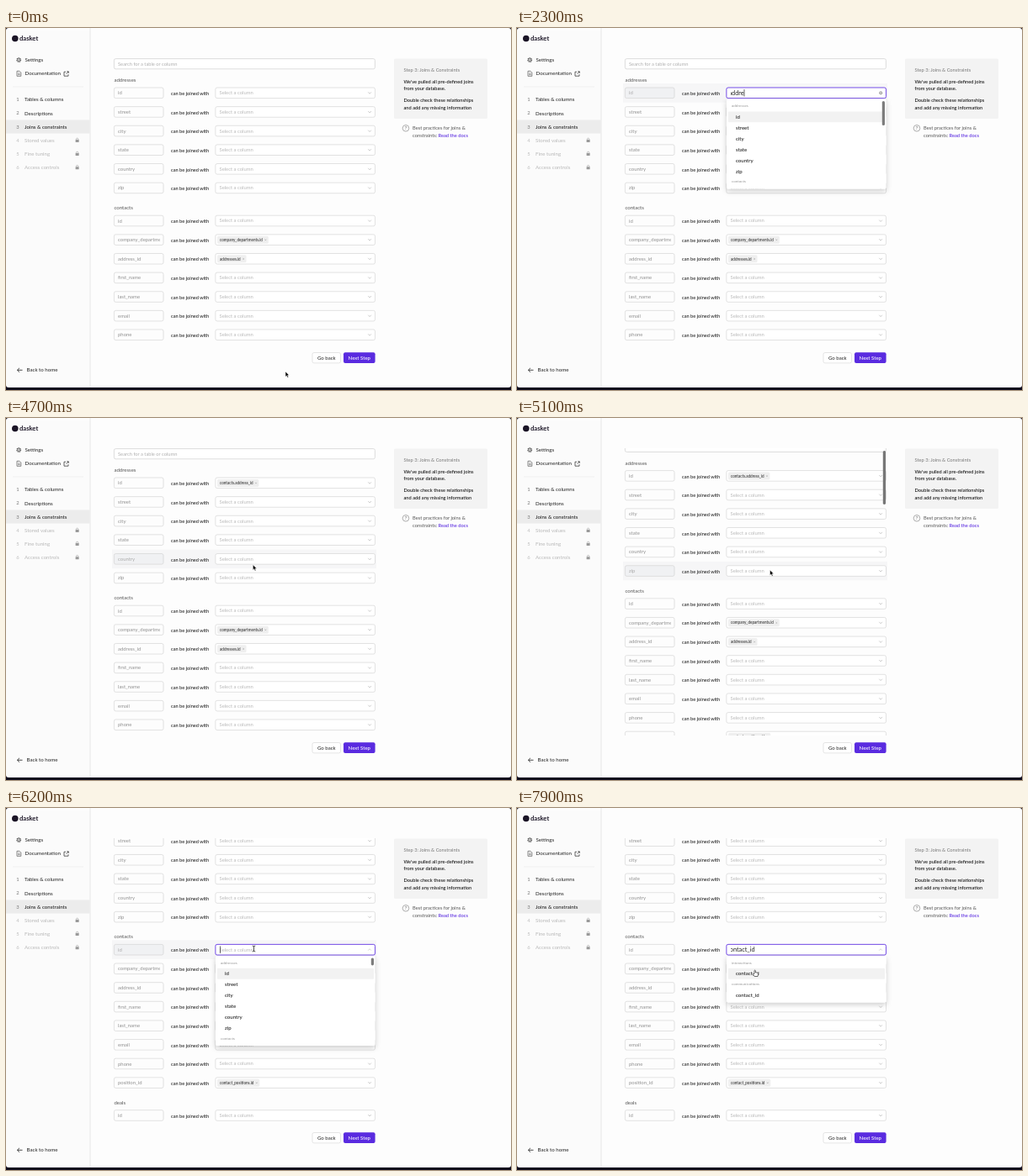
Recreate the animation shown at these times as an HTML page. Size 600 by 431 pixels, loop 8 s.

```html
<!DOCTYPE html>
<html lang="en">
<head>
<meta charset="utf-8">
<title>Joins and constraints</title>
<style>
  html, body { margin: 0; width: 100%; height: 100%; overflow: hidden; background: #0e0a1c; }
  svg { display: block; width: 600px; height: 431px; font-family: Lato, "Open Sans", sans-serif; }
</style>
</head>
<body>
<svg id="stage" viewBox="0 0 600 431" xmlns="http://www.w3.org/2000/svg">
  <defs>
    <clipPath id="listClip"><rect x="126" y="36" width="316" height="342"/></clipPath>
    <clipPath id="fieldClip"><rect x="120" y="0" width="63" height="431"/></clipPath>
    <clipPath id="inputClip"><rect x="254" y="0" width="170" height="431"/></clipPath>
    <filter id="shadow" x="-10%" y="-15%" width="120%" height="135%">
      <feDropShadow dx="0" dy="2.5" stdDeviation="3" flood-opacity=".2"/>
    </filter>
  </defs>
  <g id="shell"></g>
  <g id="live"></g>
</svg>
<script>
const LOOP = 8000, TICK = 100;
const PURPLE = '#5a2be0', GREY = '#aaa', DARK = '#222';
const ROW = 22.63, OPTION = 12.9, VIEW = 103;

const addresses = ['#addresses', 'id', 'street', 'city', 'state', 'country', 'zip', '#contacts'];
const contacts = ['#contacts', 'id', 'company_department_id', 'address_id', 'first_name', 'last_name', 'email', 'phone'];
const contactIds = ['#interactions', 'contact_id', '#communications', 'contact_id'];

const tables = [
  { name: 'addresses', y: 62, first: 77.3, fields: addresses.slice(1, 7) },
  { name: 'contacts', y: 214, first: 229.5,
    fields: ['id', 'company_departments_id', 'address_id', 'first_name', 'last_name', 'email', 'phone', 'position_id'] },
  { name: 'deals', y: 411.3, first: 426.8, fields: ['id'] }
];
const rows = tables.flatMap(t => t.fields.map((field, i) =>
  ({ key: t.name + '.' + field, field, y: t.first + i * ROW })));
const joins = {
  'contacts.company_departments_id': 'company_departments.id',
  'contacts.address_id': 'addresses.id',
  'contacts.position_id': 'contact_positions.id'
};

// Time, then values
const mousePath = [
  [0, 332, 409], [900, 227, 41.5], [1000, 227, 41.5], [1300, 272, 76], [3200, 272, 76],
  [3400, 270, 106], [3600, 270, 106], [3800, 273, 154], [4000, 273, 157], [4300, 273, 157],
  [4900, 300.5, 181], [5500, 300.5, 181], [5700, 294.5, 167.5], [7500, 294.5, 167.5], [7800, 283, 196.5]
];
const pageScroll = [[4900, 0], [5000, 2], [5100, 8.4], [5200, 25], [5300, 42], [5400, 55], [5500, 60.8]];
const menuScroll = [[3400, 0], [3700, 38.9]];
const typing = [
  [0, ''], [2100, 'ad'], [2200, 'addr'], [2300, 'addre'], [2400, 'addres'], [2500, 'address'], [4200, ''],
  [6500, 'c'], [6600, 'co'], [6700, 'cont'], [6800, 'conta'], [6900, 'contac'], [7000, 'contact'],
  [7100, 'contact_'], [7400, 'contact_i'], [7500, 'contact_id']
];
const caretOn = [[1400, 1700], [1900, 2700], [3000, 3200], [5800, 6000], [6200, 7600]];

const within = (t, a, b) => t >= a && t < b;
const ease = p => p * p * (3 - 2 * p);

function along(keys, t, curve = ease) {
  if (t <= keys[0][0]) return keys[0].slice(1);
  const i = keys.findIndex(k => k[0] > t);
  if (i < 0) return keys[keys.length - 1].slice(1);
  const a = keys[i - 1], b = keys[i], p = curve((t - a[0]) / (b[0] - a[0]));
  return a.slice(1).map((v, n) => v + (b[n + 1] - v) * p);
}

const pen = document.createElement('canvas').getContext('2d');
function widthOf(text, size, weight = 400) {
  pen.font = `${weight} 100px Lato, "Open Sans", sans-serif`;
  return pen.measureText(text).width * size / 100;
}

const text = (x, y, s, size = 5.8, fill = DARK, extra = '') =>
  `<text x="${x}" y="${y + size * .34}" font-size="${size}" fill="${fill}" ${extra}>${s.replace(/&/g, '&amp;')}</text>`;
const box = (x, y, w, h, fill, rx = 0, extra = '') =>
  `<rect x="${x}" y="${y}" width="${w}" height="${h}" rx="${rx}" fill="${fill}" ${extra}/>`;
const line = (d, stroke = '#333', w = .8, extra = '') =>
  `<path d="${d}" fill="none" stroke="${stroke}" stroke-width="${w}" ${extra}/>`;
const dot = (x, y, r, fill, extra = '') => `<circle cx="${x}" cy="${y}" r="${r}" fill="${fill}" ${extra}/>`;
const medium = 'font-weight="500"';

function shell() {
  let s = box(0, 0, 600, 428, '#fdfdfd', 3) + box(0, 3, 100, 422, '#fbfbfb') + line('M100 0V428', '#e3e3e3', .8);
  s += dot(10.8, 12.5, 3.8, '#1b1526') + text(16, 12.5, 'dasket', 7.6, '#1b1526', 'font-weight="700"');
  s += dot(15.2, 38, 2.3, 'none', 'stroke="#555" stroke-width="1.1" stroke-dasharray="1.2 .6"')
    + dot(15.2, 38, 1.8, 'none', 'stroke="#555" stroke-width=".6"') + dot(15.2, 38, .7, '#555');
  s += text(22.5, 38, 'Settings', 6.2);
  s += line('M13 51.3h3l1.8 1.8v4.2h-4.8zM14.2 54h2.4M14.2 55.6h2.4', '#555', .7);
  s += text(22.5, 54.3, 'Documentation', 6.2);
  s += line('M71 52.2h-2v5h5v-2M71.6 54.7l2.6-2.8M72.3 51.8h2v2', '#333', .75);
  s += line('M8 70H92', '#e9e9e9', .6);
  s += box(0, 109.5, 99.6, 16, '#ececec');
  ['Tables & columns', 'Descriptions', 'Joins & constraints', 'Stored values', 'Fine tuning', 'Access controls']
    .forEach((label, i) => {
      const y = 85.3 + i * 16.15, locked = i > 2;
      s += text(12.3, y, String(i + 1), 5.8, locked ? '#bbb' : '#777');
      s += text(22, y, label, 6.1, locked ? '#b8b8b8' : DARK, i === 2 ? medium : '');
      if (locked) s += box(82.6, y - .8, 4, 3, '#999', .5) + line(`M83.4 ${y - .6}v-.8a1.2 1.2 0 0 1 2.4 0v.8`, '#999', .6);
    });
  s += line('M19.5 407.3h-6M16 404.8l-2.6 2.5 2.6 2.5', DARK, .8) + text(24.5, 407.3, 'Back to home', 6.15);

  s += box(461, 36.5, 111, 71.5, '#f3f3f3', 1.5) + text(472.5, 50, 'Step 3: Joins & Constraints', 5.7, '#777');
  [[63.6, "We've pulled all pre-defined joins"], [72.3, 'from your database.'],
   [86, 'Double check these relationships'], [94.7, 'and add any missing information']]
    .forEach(([y, words]) => { s += text(472.5, y, words, 5.7, '#111', medium); });
  s += dot(475, 119.3, 3.8, 'none', 'stroke="#777" stroke-width=".6"')
    + text(475, 119.3, '?', 5.6, '#666', 'text-anchor="middle"');
  s += text(483, 119, 'Best practices for joins &', 5.75, '#555') + text(483, 127.7, 'constraints:', 5.75, '#555')
    + text(513.5, 127.7, 'Read the docs', 5.75, PURPLE, medium);

  s += box(364, 386.5, 33.5, 12.4, '#fff', 2, 'stroke="#d4d4d4" stroke-width=".6"')
    + text(380.8, 392.8, 'Go back', 6.05, DARK, 'text-anchor="middle"');
  s += box(401, 386.3, 37.6, 12.8, PURPLE, 2) + text(419.8, 392.8, 'Next Step', 6.05, '#fff', 'text-anchor="middle" ' + medium);
  return s;
}

function chip(y, label) {
  const w = widthOf(label, 4.6, 500), x = 258 + w - .6;
  return box(251, y - 4.4, w + 9.8, 9, '#efefef', 1.5) + text(254, y + .2, label, 4.6, '#333', medium)
    + line(`M${x - .8} ${y - .6}l1.6 1.6m0 -1.6l-1.6 1.6`, '#888', .4);
}

function rowView(row, y, hovered, focused, label) {
  const border = 'stroke="#cfcfcf" stroke-width=".6"';
  let s = hovered ? box(126, y - 11.3, 314, ROW, '#f6f6f7') : '';
  s += box(128.4, y - 6.3, 58.6, 12.6, hovered ? '#f0f1f3' : '#fdfdfd', 2, border);
  s += text(133, y, row.field, 5.95, hovered ? '#aaa' : '#909090', 'clip-path="url(#fieldClip)"');
  s += text(196, y + .8, 'can be joined with', 5.65, '#222', medium);
  if (focused) s += box(248.4, y - 6.9, 190.6, 13.8, '#e3d9fb', 2.4);
  s += box(248.9, y - 6.3, 189.6, 12.6, '#fff', 2, focused ? `stroke="${PURPLE}" stroke-width=".8"` : border);
  if (label) s += chip(y, label);
  else if (!focused) s += text(253.5, y, 'Select a column', 5.85, '#b9b9b9');
  if (!focused) s += line(`M430.3 ${y - .9}l1.8 1.9 1.8 -1.9`, '#aaa', .6);
  return s;
}

function searchInput(y, typed, caret, clearable) {
  const size = 7.3, end = 254 + .86 * widthOf(typed, size);
  let s = typed ? `<g clip-path="url(#inputClip)">${text(end, y, typed, size, '#222', 'text-anchor="end"')}</g>`
    : text(253.5, y, 'Select a column', 5.85, '#b9b9b9');
  if (caret) s += box(typed ? end : 254, y - 4.2, .7, 8.4, '#222');
  s += clearable
    ? dot(432.2, y, 2.1, '#aaa') + line(`M431.5 ${y - .7}l1.4 1.4m0 -1.4l-1.4 1.4`, '#fff', .5)
    : line(`M430.3 ${y + .9}l1.8 -1.9 1.8 1.9`, '#bbb', .6);
  return s;
}

function menuFor(typed) {
  if (!typed) return { items: addresses, thumb: 9 };
  if (typed[0] === 'a') return { items: [...addresses, 'address_id', '#companies', 'address_id'], thumb: 29 };
  if (typed.length < 2) return { items: ['#addresses', 'city', 'country', ...contacts], thumb: 14 };
  if (typed.length < 3) return { items: ['#addresses', 'country', ...contacts], thumb: 16 };
  if (typed.length < 8) return { items: contacts, thumb: 24 };
  return { items: typed === 'contact_' ? [...contactIds, '#contact_positions', 'id'] : contactIds, thumb: 0 };
}

function menuView(y, typed, scroll, active, opacity) {
  const { items, thumb } = menuFor(typed);
  const top = y + 9.2, h = Math.min(VIEW, items.length * OPTION);
  let s = box(249, top - 2, 189.6, h + 4, '#fff', 2, 'filter="url(#shadow)"');
  s += `<clipPath id="menuClip">${box(249, top, 190, h, '#000')}</clipPath><g clip-path="url(#menuClip)">`;
  items.forEach((item, i) => {
    const mid = top + (i + .5) * OPTION - scroll;
    if (i === active) s += box(251, mid - OPTION / 2, 186, OPTION, '#f2f2f2', 1);
    s += item[0] === '#' ? text(255, mid - .4, item.slice(1), 4.6, '#999')
      : text(260, mid + .1, item, 6.05, '#1c1c1c', medium);
  });
  s += '</g>';
  if (thumb) {
    const slide = (VIEW - thumb) * Math.min(1, scroll / 38.9);
    s += box(433.8, top + .5 + slide, 3.2, thumb, '#7d7d7d', 1.6);
  }
  return `<g opacity="${opacity}">${s}</g>`;
}

function cursor(kind, x, y) {
  const shapes = {
    arrow: '<path d="M0 0V6.2L1.5 4.9L2.5 7.2L3.6 6.7L2.6 4.5H4.5Z" fill="#000" stroke="#fff" stroke-width=".5"/>',
    beam: line('M-1.7 -3.4Q0 -3.4 0 -2.4Q0 -3.4 1.7 -3.4M0 -2.6V2.6M-1.7 3.4Q0 3.4 0 2.4Q0 3.4 1.7 3.4', '#222', .8),
    hand: '<path d="M-1 -3Q-.3 -3.8 .3 -3V-.8L3 -.3Q3.8 0 3.6 1.2L3 4H-.8L-2.8 1.2Q-2.6 .2 -1 1Z" fill="#fff" stroke="#222" stroke-width=".65"/>'
  };
  return `<g transform="translate(${x} ${y})">${shapes[kind]}</g>`;
}

function activeOption(t) {
  if (t < 3500 || t >= 4200) return 1;
  return t < 3700 ? 1 + Math.round(along(menuScroll, t)[0] / OPTION) : t < 3900 ? 4 : 8;
}

function scene(t) {
  const [mx, my] = along(mousePath, t);
  const [offset] = along(pageScroll, t, p => p);
  const typed = typing.filter(k => k[0] <= t).pop()[1];
  const focusKey = within(t, 1400, 4300) ? 'addresses.id' : t >= 5800 ? 'contacts.id' : '';
  const menuOpacity = t === 1400 || t === 4200 || t === 5800 ? .5 : 1;
  const focusRow = rows.find(r => r.key === focusKey);
  const focusY = focusRow ? focusRow.y - offset : 0;
  const onMenu = focusRow && my > focusY + 9;
  const overSearch = my < 49 && offset === 0;

  let s = '<g clip-path="url(#listClip)">';
  const searchY = 42.7 - offset;
  if (overSearch) s += box(128, searchY - 6.6, 311, 13.2, '#ebe4fc', 2.4);
  s += box(128.4, searchY - 6.1, 310, 12.2, '#fff', 2, `stroke="${overSearch ? '#8b5cf0' : '#cfcfcf'}" stroke-width=".7"`);
  s += text(133, searchY + .2, 'Search for a table or column', 5.75, '#b0b0b0');
  tables.forEach(table => { s += text(128.4, table.y - offset, table.name, 6.05, '#555'); });
  rows.forEach(row => {
    const y = row.y - offset;
    const hovered = !onMenu && my < 378 && Math.abs(my - y) < ROW / 2;
    const picked = row.key === 'addresses.id' && t >= 4200 ? 'contacts.address_id' : joins[row.key];
    s += rowView(row, y, hovered, row === focusRow, picked);
  });
  if (within(t, 5000, 5900))
    s += box(434.8, 37.4 + offset * .187, 3.3, 64, '#777', 1.6, `opacity="${t < 5700 ? 1 : .5}"`);
  s += '</g>';

  if (focusRow) {
    const caret = caretOn.some(([a, b]) => within(t, a, b));
    if (t !== 4200) s += searchInput(focusY, typed, caret, typed && !onMenu);
    s += menuView(focusY, typed, along(menuScroll, t)[0] * (t < 4200), activeOption(t), menuOpacity);
  }
  const hidden = within(t, 2100, 3200) || within(t, 6500, 7500);
  if (!hidden) {
    const onInput = overSearch || (focusRow && Math.abs(my - focusY) < 7);
    s += cursor(onInput ? 'beam' : onMenu ? 'hand' : 'arrow', mx, my);
  }
  return s;
}

const live = document.getElementById('live');
document.getElementById('shell').innerHTML = shell();
const start = performance.now();
let shown = -1;

function update(now) {
  const t = Math.floor((Math.max(0, now - start) % LOOP) / TICK) * TICK;
  if (t !== shown) live.innerHTML = scene(shown = t);
  requestAnimationFrame(update);
}
update(start);
</script>
</body>
</html>
```
